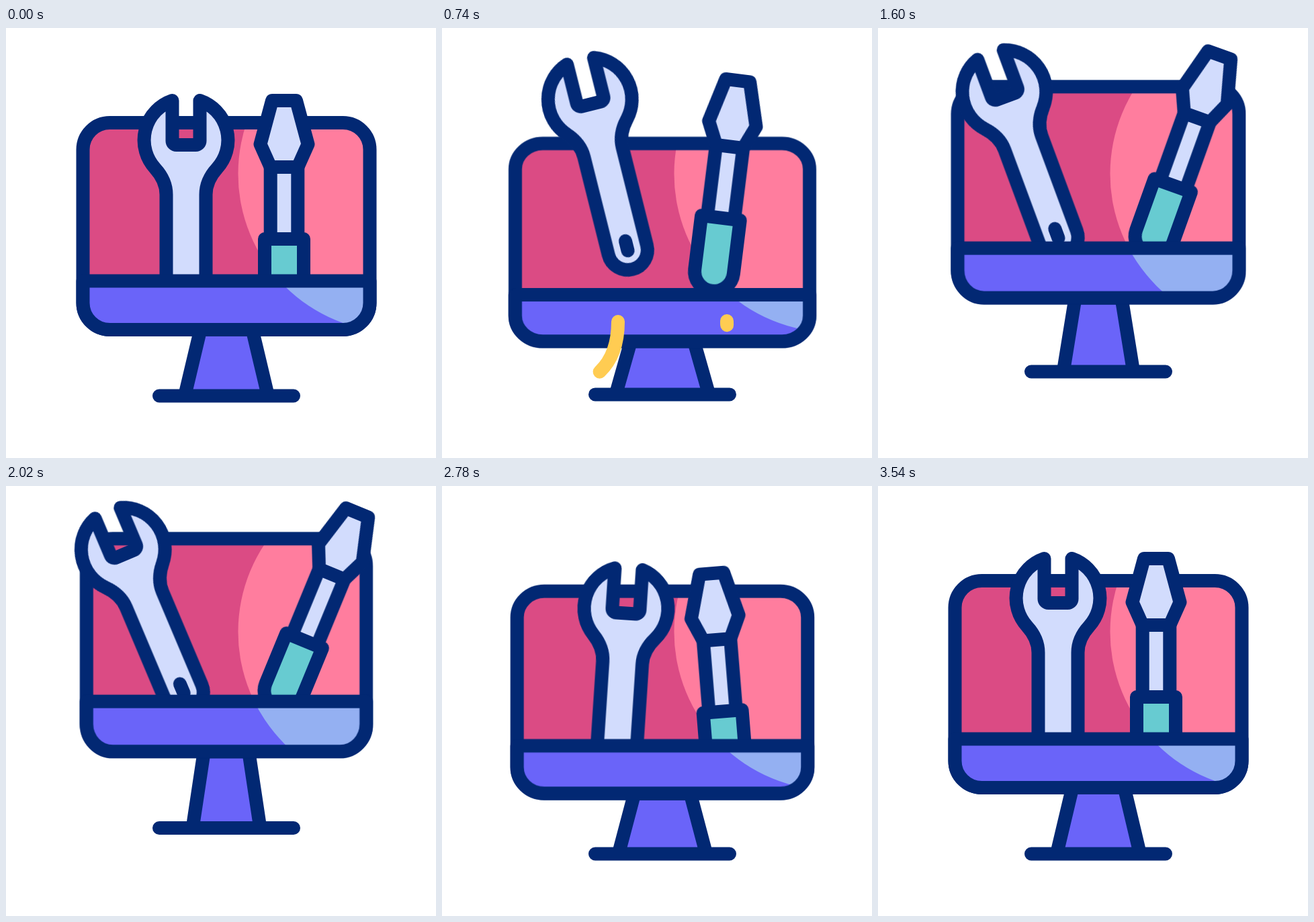
An HTML page without scripts for the animation above (3.6 s loop, 640 px wide and 640 px high).

```html
<!DOCTYPE html>
<html lang="en">
<head>
<meta charset="utf-8">
<title>Computer repair</title>
<style>
  html, body { margin: 0; width: 100%; height: 100%; overflow: hidden; background: #fff; }
  svg { display: block; width: 100vw; height: 100vh; }

  .line { stroke: #022873; stroke-width: 20; stroke-linecap: round; stroke-linejoin: round; }
  .pink { fill: #db4b84; }
  .pink-light { fill: #ff7d9e; }
  .violet { fill: #6a64f9; }
  .violet-light { fill: #94b0f2; }
  .steel { fill: #d2dcfd; }
  .teal { fill: #67cbd1; }
  .hollow { fill: none; }

  .screen, .stand, .wrench, .driver { animation: 3.6s linear infinite; }
  .screen { animation-name: screen; vector-effect: non-scaling-stroke; }
  .stand { animation-name: stand; }
  .wrench { animation-name: wrench; }
  .driver { animation-name: driver; }

  .spark {
    fill: none; stroke: #ffcc52; stroke-width: 20; stroke-linecap: round;
    animation: head 3.6s infinite both, tail 3.6s infinite both, show 3.6s step-end infinite both;
  }
  .late { animation-delay: .1s; }

  /* The body crouches, leaps, hangs, lands and settles. */
  @keyframes screen {
    0% { transform: translate(328px, 449px) scale(1, 1); animation-timing-function: cubic-bezier(.4, 0, .7, .85); }
    15% { transform: translate(328px, 466px) scale(1.024, .958); animation-timing-function: ease-out; }
    17.78% { transform: translate(328px, 469.5px) scale(1.033, .948); animation-timing-function: ease-in; }
    20.56% { transform: translate(328px, 466.5px) scale(1.026, .956); animation-timing-function: cubic-bezier(.3, .2, .4, 1); }
    27.22% { transform: translate(328px, 411px) scale(.992, 1.005); }
    44.44% { transform: translate(328px, 401.5px) scale(.981, 1.02); }
    58.33% { transform: translate(328px, 394px) scale(.974, 1.03); animation-timing-function: cubic-bezier(.5, 0, .9, .7); }
    65.56% { transform: translate(328px, 406px) scale(.98, 1.024); }
    69.44% { transform: translate(328px, 438px) scale(.999, 1); animation-timing-function: cubic-bezier(.3, .5, .6, 1); }
    75% { transform: translate(328px, 459.5px) scale(1.018, .972); animation-timing-function: ease-in; }
    77.22% { transform: translate(328px, 457.5px) scale(1.013, .977); animation-timing-function: cubic-bezier(.3, .3, .6, 1); }
    90%, 100% { transform: translate(328px, 449px) scale(1, 1); }
  }
  @keyframes stand {
    0% { d: path("M228 547.5H428M266 547.5L289.4 449H366.6L390 547.5Z"); animation-timing-function: cubic-bezier(.4, 0, .7, .85); }
    15% { d: path("M228 548H428M259 548L281.5 466H374.5L397 548Z"); animation-timing-function: ease-out; }
    17.78% { d: path("M228 548.5H428M257 548.5L279.5 469.5H376.5L399 548.5Z"); animation-timing-function: ease-in; }
    20.56% { d: path("M228 545.5H428M258.5 545.5L281 466.5H375L397.5 545.5Z"); animation-timing-function: cubic-bezier(.3, .2, .4, 1); }
    27.22% { d: path("M228 515H428M271.7 515L291 411H365L384.3 515Z"); }
    44.44% { d: path("M228 511.5H428M275.8 511.5L293.6 401.5H362.4L380.2 511.5Z"); }
    58.33% { d: path("M228 508.5H428M278 508.5L295 394H361L378 508.5Z"); animation-timing-function: cubic-bezier(.5, 0, .9, .7); }
    65.56% { d: path("M228 518.5H428M273.7 518.5L293.2 406H362.8L382.3 518.5Z"); }
    69.44% { d: path("M228 546H428M268 546L290 438H366L388 546Z"); animation-timing-function: cubic-bezier(.3, .5, .6, 1); }
    75% { d: path("M228 548.3H428M262 548.3L285.5 459.5H370.5L394 548.3Z"); animation-timing-function: ease-in; }
    77.22% { d: path("M228 547.5H428M262.7 547.5L286.5 457.5H369.5L393.3 547.5Z"); animation-timing-function: cubic-bezier(.3, .3, .6, 1); }
    90%, 100% { d: path("M228 547.5H428M266 547.5L289.4 449H366.6L390 547.5Z"); }
  }

  /* The tools fly out, drift apart, and drop back with a wobble. */
  @keyframes wrench {
    0% { transform: translate(268px, 167px) rotate(0deg); animation-timing-function: ease-in-out; }
    15.56% { transform: translate(272px, 190px) rotate(3deg); animation-timing-function: cubic-bezier(.4, 0, .7, .8); }
    20.56% { transform: translate(220.5px, 106.5px) rotate(-14deg); animation-timing-function: cubic-bezier(.2, .6, .5, 1); }
    27.22% { transform: translate(203.8px, 97px) rotate(-17.2deg); }
    44.44% { transform: translate(188px, 95.2px) rotate(-20.3deg); }
    58.33% { transform: translate(171.8px, 94.5px) rotate(-23.4deg); animation-timing-function: cubic-bezier(.4, 0, .8, .7); }
    65.56% { transform: translate(216px, 156px) rotate(-5.5deg); animation-timing-function: cubic-bezier(.2, .5, .5, 1); }
    73.89% { transform: translate(275px, 185px) rotate(4.4deg); animation-timing-function: ease-in; }
    77.22% { transform: translate(274px, 182.5px) rotate(3.8deg); animation-timing-function: cubic-bezier(.3, .2, .6, 1); }
    90.56% { transform: translate(265.3px, 166.5px) rotate(-.8deg); animation-timing-function: ease-in-out; }
    98%, 100% { transform: translate(268px, 167px) rotate(0deg); }
  }
  @keyframes driver {
    0% { transform: translate(414px, 173px) rotate(0deg); animation-timing-function: ease-in-out; }
    16.67% { transform: translate(407px, 197px) rotate(-4deg); animation-timing-function: cubic-bezier(.4, 0, .8, .7); }
    20.56% { transform: translate(432px, 143px) rotate(7deg); animation-timing-function: cubic-bezier(.2, .5, .5, 1); }
    27.22% { transform: translate(470px, 105px) rotate(15.8deg); }
    44.44% { transform: translate(486.3px, 101.5px) rotate(19.7deg); }
    58.33% { transform: translate(500px, 99.5px) rotate(22.9deg); animation-timing-function: cubic-bezier(.4, 0, .8, .7); }
    65.56% { transform: translate(477.5px, 144px) rotate(9.5deg); animation-timing-function: cubic-bezier(.2, .4, .5, 1); }
    75% { transform: translate(405.5px, 197px) rotate(-4.9deg); animation-timing-function: ease-in; }
    77.22% { transform: translate(406.3px, 195px) rotate(-4.6deg); animation-timing-function: cubic-bezier(.3, .2, .6, 1); }
    90.56% { transform: translate(416px, 172.6px) rotate(.7deg); animation-timing-function: ease-in-out; }
    98%, 100% { transform: translate(414px, 173px) rotate(0deg); }
  }

  @keyframes head {
    0%, 16.67% { stroke-dasharray: 0 200; animation-timing-function: ease-in-out; }
    23.33%, 100% { stroke-dasharray: 100 200; }
  }
  @keyframes tail {
    0%, 21.67% { stroke-dashoffset: 0; animation-timing-function: cubic-bezier(.4, 0, .5, 1); }
    30.56%, 100% { stroke-dashoffset: -100; }
  }
  @keyframes show {
    0% { opacity: 0; }
    16.67% { opacity: 1; }
    30.56%, 100% { opacity: 0; }
  }
</style>
</head>
<body>
<svg viewBox="0 0 640 640">
  <defs>
    <rect id="case" x="-213.5" y="-308" width="427" height="308" rx="40"/>
    <path id="bar" d="M-213.5 -72.5H213.5V-40A40 40 0 0 1 173.5 0H-173.5A40 40 0 0 1 -213.5 -40Z"/>
    <circle id="glare" cx="581.5" cy="217" r="236"/>
    <clipPath id="in-case"><rect class="screen" x="-213.5" y="-308" width="427" height="308" rx="40"/></clipPath>
    <clipPath id="in-bar"><path class="screen" d="M-213.5 -72.5H213.5V-40A40 40 0 0 1 173.5 0H-173.5A40 40 0 0 1 -213.5 -40Z"/></clipPath>
  </defs>

  <path class="stand violet line" d="M228 547.5H428M266 547.5L289.4 449H366.6L390 547.5Z"/>

  <g clip-path="url(#in-case)">
    <rect class="pink" width="640" height="640"/>
    <use href="#glare" class="pink-light"/>
  </g>
  <rect class="screen hollow line" x="-213.5" y="-308" width="427" height="308" rx="40"/>

  <g class="wrench line">
    <path class="steel" d="M-20.5 -59A62.3 62.3 0 0 0 -46 42Q-29.5 60 -29.5 81V231A29.5 29.5 0 0 0 29.5 231V81Q29.5 60 46 42A62.3 62.3 0 0 0 20.5 -59V1a6 6 0 0 1 -6 6H-14.5a6 6 0 0 1 -6 -6Z"/>
    <path d="M0 217V232"/>
  </g>
  <g class="driver line">
    <path class="steel" d="M-20.3 34H20.3V141H-20.3Z"/>
    <path class="steel" d="M-18 -65H18L35.5 0L20.3 34H-20.3L-35.5 0Z"/>
    <path class="teal" d="M-29 141H29V221.5A29 29 0 0 1 -29 221.5Z"/>
  </g>

  <g clip-path="url(#in-bar)">
    <rect class="violet" width="640" height="640"/>
    <use href="#glare" class="violet-light"/>
  </g>
  <path class="screen hollow line" d="M-213.5 -72.5H213.5V-40A40 40 0 0 1 173.5 0H-173.5A40 40 0 0 1 -213.5 -40Z"/>

  <path class="spark" pathLength="100" d="M262 437Q262 513 196 533"/>
  <path class="spark late" pathLength="100" d="M424 436Q424 495 469 524"/>
</svg>
</body>
</html>
```
